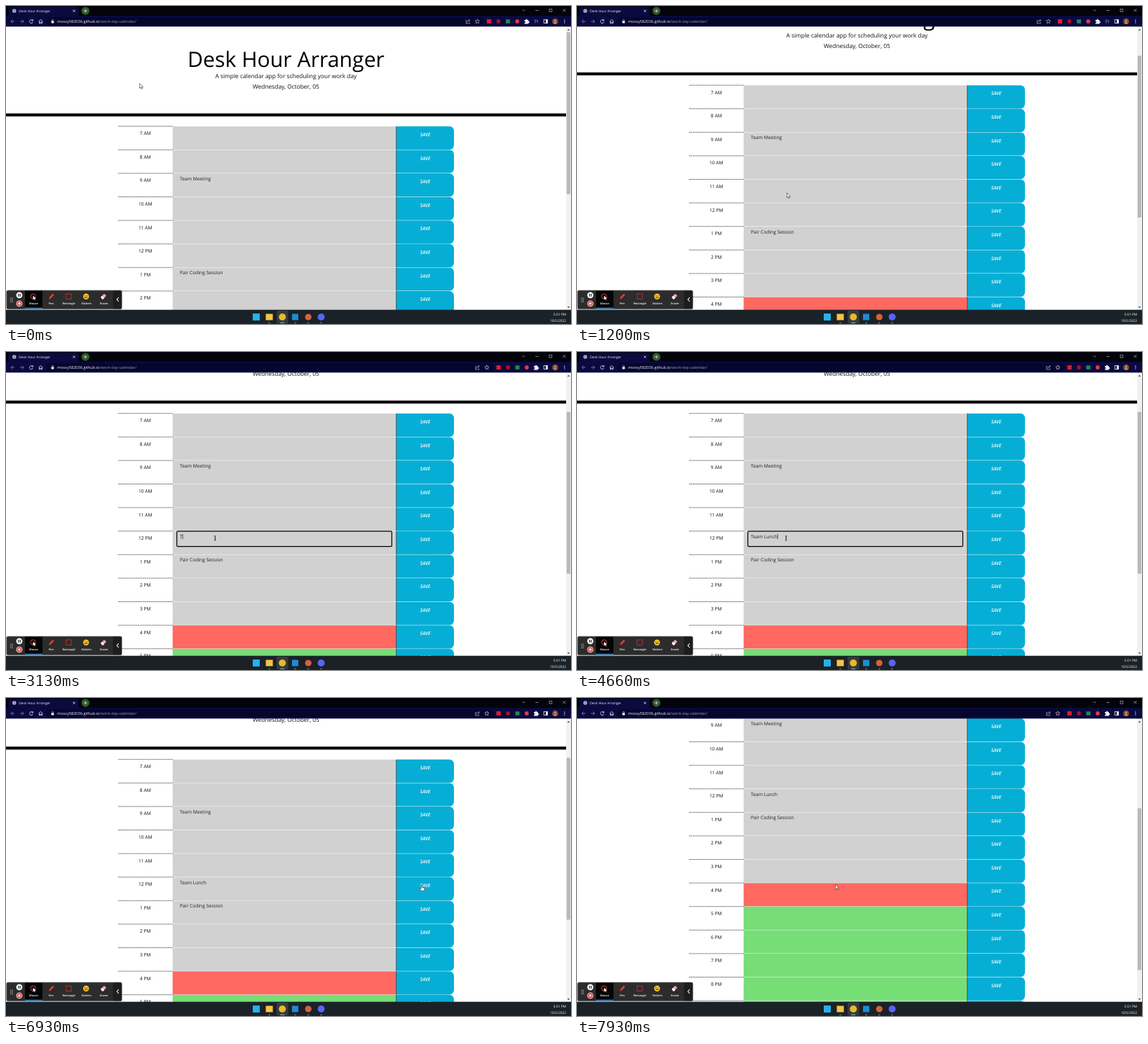
Write an HTML page that moves like this. It is 806 px wide and 454 px high and loops after 8000 ms.

```html
<!DOCTYPE html>
<html lang="en">
<head>
<meta charset="utf-8">
<title>Desk Hour Arranger</title>
<style>
html, body { margin: 0; width: 100%; height: 100%; overflow: hidden; background: #fff; }
svg { display: block; width: 100vw; height: 100vh; }
text { font-family: "Open Sans", sans-serif; text-rendering: geometricPrecision; white-space: pre; }
.mid { text-anchor: middle; }
.line { fill: none; stroke: #e8e8ee; stroke-width: .8; }
</style>
</head>
<body>
<svg id="stage" viewBox="0 0 806 454"></svg>
<script>
const LOOP = 8000, STEP = 1000 / 15;
const ROW_TOP = 171.4, ROW_H = 33.6, BODY = 6.72;
const NOON = 5;

const rect = (x, y, w, h, fill, extra = '') =>
  `<rect x="${x}" y="${y}" width="${w}" height="${h}" fill="${fill}" ${extra}/>`;
const circle = (x, y, r, fill, extra = '') =>
  `<circle cx="${x}" cy="${y}" r="${r}" fill="${fill}" ${extra}/>`;
const text = (x, y, size, str, fill = '#111', extra = '') =>
  `<text x="${x}" y="${y}" font-size="${size}" fill="${fill}" ${extra}>${str}</text>`;
const line = (d, extra = '') => `<path class="line" d="${d}" ${extra}/>`;

function row(i) {
  const hour = i + 7;
  const y = ROW_TOP + i * ROW_H, top = y + .45, h = ROW_H - .45;
  const label = `${hour > 12 ? hour - 12 : hour} ${hour < 12 ? 'AM' : 'PM'}`;
  const fill = hour < 16 ? '#d1d1d1' : hour === 16 ? '#ff6961' : '#77dd77';
  const note = { 9: 'Team Meeting', 13: 'Pair Coding Session' }[hour] || '';
  return rect(237.7, top, 319, h, fill) +
    `<path d="M160 ${y + .3}H237.7" stroke="#000" stroke-width=".7" stroke-dasharray="1.6 .95"/>` +
    text(198.8, y + 12.7, BODY, label, '#111', 'class="mid"') +
    text(248, y + 10.2, BODY, note, '#222', i === NOON ? 'id="note"' : '') +
    `<path d="M557 ${top}h75.7a6.3 6.3 0 0 1 6.3 6.3v${h - 12.6}a6.3 6.3 0 0 1 -6.3 6.3h-75.7z" fill="#06aed5"/>` +
    rect(556.5, top, .6, h, '#000') +
    text(598, y + 14.5, BODY, 'SAVE', '#fff',
      `class="mid" font-style="italic" font-weight="600" ${i === NOON ? 'id="save"' : ''}`);
}

function page() {
  const y = ROW_TOP + NOON * ROW_H;
  return '<g id="page">' +
    text(399.5, 86.6, 30.24, 'Desk Hour Arranger', '#000', 'class="mid"') +
    text(399.4, 103.2, 8.4, 'A simple calendar app for scheduling your work day', '#111', 'class="mid"') +
    text(399.4, 118.3, 8.4, 'Wednesday, October, 05', '#111', 'class="mid"') +
    rect(0, 153.4, 799, 4.2, '#000') +
    Array.from({ length: 15 }, (_, i) => row(i)).join('') +
    `<g id="focus">${rect(243.7, y + .5, 306.7, 21.7, 'none', 'rx="1.4" stroke="#000" stroke-width="1.2"')}</g>` +
    rect(0, y + 4.2, .6, 7.6, '#000', 'id="caret"') + '</g>';
}

const scrollbar = () => rect(799, 29.4, 7, 404.4, '#f1f1f1') +
  '<path d="M800.6 35l1.9-2.2 1.9 2.2zM800.6 429l1.9 2.2 1.9-2.2z" fill="#555"/>' +
  rect(799.8, 37.5, 5.2, 231, '#b9b9b9', 'id="thumb"');

function browser() {
  const puzzle = '<path d="M739.6 20h2v-.6a1 1 0 0 1 2 0v.6h1.8v1.9h.5a1 1 0 0 1 0 2h-.5v1.6h-5.8v-1.8h.5a.9.9 0 0 0 0-1.8h-.5z" fill="#f0f0f4"/>';
  const tools =
    line('M657.5 20.5h-1.2v4.4h5v-1.5M658 23q.3-2.4 3.2-2.4M660 19l1.8 1.6-1.8 1.6', 'style="stroke-width:.6"') +
    line('M672.4 18.9l.9 2 2.2.2-1.7 1.5.5 2.1-1.9-1.1-1.9 1.1.5-2.1-1.7-1.5 2.2-.2z', 'style="stroke-width:.6"') +
    rect(686, 19, 6.2, 6, '#d8202c') + circle(702.5, 22, 2.9, '#a8121d') +
    rect(713, 19.2, 6, 5.6, '#1d8a4c') + circle(729.3, 22, 2.9, '#e03a42') + puzzle;
  return rect(0, 0, 806, 14.5, '#03030c') + rect(0, 14, 806, 15.4, '#0a0a40') +
    '<path d="M1 14.5q2.4 0 2.4-2.4V3.5q0-2.3 2.3-2.3h95.6q2.3 0 2.3 2.3v8.6q0 2.4 2.4 2.4z" fill="#0a0a40"/>' +
    circle(11.8, 7, 2.7, '#c9cdd4') + line('M9.2 7h5.2M11.8 4.4q-2 2.6 0 5.2q2-2.6 0-5.2', 'style="stroke:#333a55;stroke-width:.4"') +
    text(18.3, 8.8, 4.85, 'Desk Hour Arranger', '#f2f2f6') +
    line('M95.5 5.4l3.2 3.2M98.7 5.4l-3.2 3.2') +
    circle(113.3, 7, 5.8, '#2f5a2c') + line('M110.8 7h5M113.3 4.5v5') +
    line('M736.6 5.2l1.9 1.9 1.9-1.9M755.2 6.4h4.6M775 4.3h3.8v3.8h-3.8zM794.4 4.2l4 4M798.4 4.2l-4 4', 'style="stroke-width:.55"') +
    line('M12.2 22H7M9.4 19.6L7 22l2.4 2.4M20 22h5.2M22.8 19.6l2.4 2.4-2.4 2.4', 'style="stroke:#8d8da8"') +
    line('M38 20.5a2.5 2.5 0 1 0 .5 2.2M38.4 19v2h-2') +
    line('M46.6 22l2.9-2.6 2.9 2.6M47.5 21.6v3.2h1.3v-1.7h1.4v1.7h1.3v-3.2') +
    rect(57.5, 16, 624.5, 11.8, '#05052e', 'rx="5.9" id="omni"') +
    rect(64.6, 21.3, 3.8, 3.2, '#e8e8ee', 'rx=".4"') + line('M65.4 21.5v-1.1a1.1 1.1 0 0 1 2.2 0v1.1', 'style="stroke-width:.6"') +
    text(73, 24, 5.6, 'mossy582036.github.io<tspan fill="#9c9cb4">/work-day-calendar/</tspan>', '#f4f4f8') +
    `<g id="tools">${tools}</g>` +
    line('M753.6 20.2h4M753.6 22h4M753.6 23.8h2.2M758.5 20.2v4', 'id="queue" style="stroke:#a5a5bd;stroke-width:.6"') +
    rect(767.2, 19.5, 5.4, 5, 'none', 'stroke="#f0f0f4" stroke-width=".8"') + rect(770, 19.5, 2.6, 5, '#f0f0f4') +
    circle(783.4, 22, 4.4, '#7c4a2c') + circle(783.4, 20.9, 1.5, '#c99a73') +
    '<path d="M780.5 25.1q2.9-4 5.8 0z" fill="#c99a73"/>' +
    [19.9, 22, 24.1].map(y => circle(796.8, y, .65, '#f0f0f4')).join('');
}

function taskbar() {
  const marks = [rect(352, 439, 10, 10, '#22b2ee'), rect(370.6, 439.5, 10, 9, '#f5c445'),
    circle(394.2, 444, 5, '#e8b92e'), rect(408, 439.5, 9, 9, '#1f8ad2'),
    circle(431.2, 444, 4.6, '#d9613c'), circle(449.6, 444, 5, '#5865f2')];
  return rect(0, 433.7, 806, 20.3, '#1a2227') + rect(386, 435, 16.5, 18, '#343b3d', 'rx="1.5"') +
    marks.join('') +
    [375.6, 394.2, 412.6, 431.2, 449.6].map((x, i) => i === 1
      ? rect(x - 3.2, 451.7, 6.4, 1.1, '#7cc4e8', 'rx=".5"')
      : rect(x - 1.3, 451.7, 2.6, 1, '#9aa0a3', 'rx=".5"')).join('') +
    text(799, 442.4, 4.85, '5:01 PM', '#fff', 'text-anchor="end"') +
    text(799, 450.6, 4.85, '10/5/2022', '#fff', 'text-anchor="end"');
}

function recorder() {
  const labels = ['Mouse', 'Pen', 'Rectangle', 'Stickers', 'Eraser'];
  let dots = '';
  for (let i = 0; i < 6; i++) dots += circle(6.8 + i % 2 * 2.3, 417.2 + (i >> 1) * 2.5, .65, '#ddd');
  return rect(.8, 406, 164.4, 26.8, '#2c2c2c', 'rx="2" stroke="#6b6b6b" stroke-width=".8"') +
    rect(152.6, 406.5, 12.2, 25.8, '#1d1d1d', 'rx="1.6"') + dots +
    circle(19, 412.8, 4.4, '#fff') + rect(17.2, 410.8, 1.2, 4, '#222') + rect(19.6, 410.8, 1.2, 4, '#222') +
    circle(19, 424.8, 4.4, '#fff') + circle(19, 424.8, 3.6, '#e5383b') + rect(17.5, 423.3, 3, 3, '#fff') +
    rect(27, 406.6, 25, 25.4, '#050505') + rect(27, 430.8, 25, 1.2, '#2f8fe0') +
    circle(38.7, 414.5, 3.6, 'none', 'stroke="#e5484d" stroke-width=".9"') +
    '<path d="M38.6 413.6v5.8l1.4-1.3 1 2 .9-.4-.9-2h1.8z" fill="#fff"/>' +
    '<path d="M61.2 418.4l.8-2.6 4.6-5 2 1.8-4.8 4.9z" fill="#ea3b3f"/>' +
    rect(85.8, 411, 7.4, 7.4, 'none', 'stroke="#e33438" stroke-width="1" stroke-dasharray="1.7 .6"') +
    circle(114.2, 414.8, 4.2, '#f6c431') +
    circle(112.7, 413.7, .6, '#4a3208') + circle(115.7, 413.7, .6, '#4a3208') +
    '<path d="M111.7 415.4a2.6 2.2 0 0 0 5 0z" fill="#7a3b12"/>' +
    '<path d="M135.2 415.8l4.7-5 3.3 2.6-4.6 5h-1.4z" fill="#f0a3a8"/><path d="M135.2 415.8l1.8-2 3.3 2.7-1.7 1.9h-1.4z" fill="#fff"/>' +
    labels.map((s, i) => text(39.4 + i * 25.1, 425.7, 3.9, s, '#fff', 'class="mid" font-weight="600"')).join('') +
    line('M160.8 416l-2.6 3 2.6 3', 'style="stroke:#fff;stroke-width:1.1"');
}

const cursors = {
  arrow: '<path d="M0 0v7l1.6-1.5 1.1 2.5 1.2-.5-1.1-2.5h2.2z" fill="#fff" stroke="#111" stroke-width=".55"/>',
  beam: '<path d="M-1.4-3.3q1.4 0 1.4.7v5.2q0 .7-1.4.7M1.4-3.3q-1.4 0-1.4.7v5.2q0 .7 1.4.7" fill="none" stroke="#111" stroke-width=".65"/>',
  hand: '<path d="M-.7.6q.7-1.2 1.4 0v2.6l3 .8q.7.3.5 1.3l-.7 2.7h-4l-2.3-3q-.2-1 .8-.7l1.3.9z" fill="#fff" stroke="#111" stroke-width=".5"/>'
};

const stage = document.getElementById('stage');
stage.innerHTML = rect(0, 0, 806, 454, '#fff') + page() + scrollbar() + browser() + taskbar() + recorder() +
  Object.entries(cursors).map(([id, art]) => `<g id="${id}">${art}</g>`).join('');

const el = id => document.getElementById(id);
const show = (id, on) => el(id).setAttribute('visibility', on ? 'visible' : 'hidden');
const move = (id, x, y) => el(id).setAttribute('transform', `translate(${x} ${y})`);
const clamp = x => Math.max(0, Math.min(1, x));
const progress = (t, a, b) => clamp((t - a) / (b - a));
const smooth = p => p * p * (3 - 2 * p);
const inOut = p => p < .5 ? 2 * p * p : 1 - 2 * (1 - p) ** 2;
const within = (t, a, b) => t >= a && t < b;

// [start, end, x, y] of each pointer move
const moves = [[0, 860, 299.5, 266.8], [1860, 2260, 298.3, 265.8], [5200, 6000, 598, 266.8],
  [6860, 7600, 415.2, 281], [7600, 7930, 368.6, 266.4]];
const keys = [3060, 3460, 3600, 3730, 3860, 4060, 4200, 4330, 4460, 4600];

function pointer(t) {
  let x = 190.7, y = 110.5;
  for (const [a, b, nx, ny] of moves) {
    const p = smooth(progress(t, a, b));
    x += (nx - x) * p;
    y += (ny - y) * p;
  }
  return [x, y];
}

function scrollAt(t) {
  return 84 * (1 - (1 - progress(t, 930, 1530)) ** 2) + 126 * inOut(progress(t, 7580, 7930));
}

function draw(t) {
  const s = scrollAt(t);
  move('page', 0, -s);
  move('thumb', 0, s * .571);

  const note = el('note');
  note.textContent = 'Team Lunch'.slice(0, keys.filter(k => t >= k).length);
  show('focus', within(t, 2400, 6200));
  show('caret', within(t, 2400, 2930) || within(t, 3060, 5200) || within(t, 5730, 6200));
  el('caret').setAttribute('x', 248 + note.getComputedTextLength());

  const size = BODY + (t < 6900 ? 1.68 * smooth(progress(t, 5890, 6190)) : 0);
  el('save').setAttribute('font-size', size);
  el('save').setAttribute('y', ROW_TOP + NOON * ROW_H + 14.5 + (size - BODY) * .9);

  const wide = t >= 1860;
  move('tools', wide ? 13.5 : 0, 0);
  show('queue', !wide);
  el('omni').setAttribute('width', wide ? 638 : 624.5);

  const [x, y] = pointer(t);
  const kind = x > 556 ? 'hand' : within(t, 1860, 6460) ? 'beam' : 'arrow';
  for (const id in cursors) show(id, id === kind);
  move(kind, x, y);
}

const start = performance.now();
function tick() {
  const t = (performance.now() - start) % LOOP;
  draw(Math.floor((t + 7) / STEP) * STEP % LOOP);
  requestAnimationFrame(tick);
}
tick();
</script>
</body>
</html>
```
